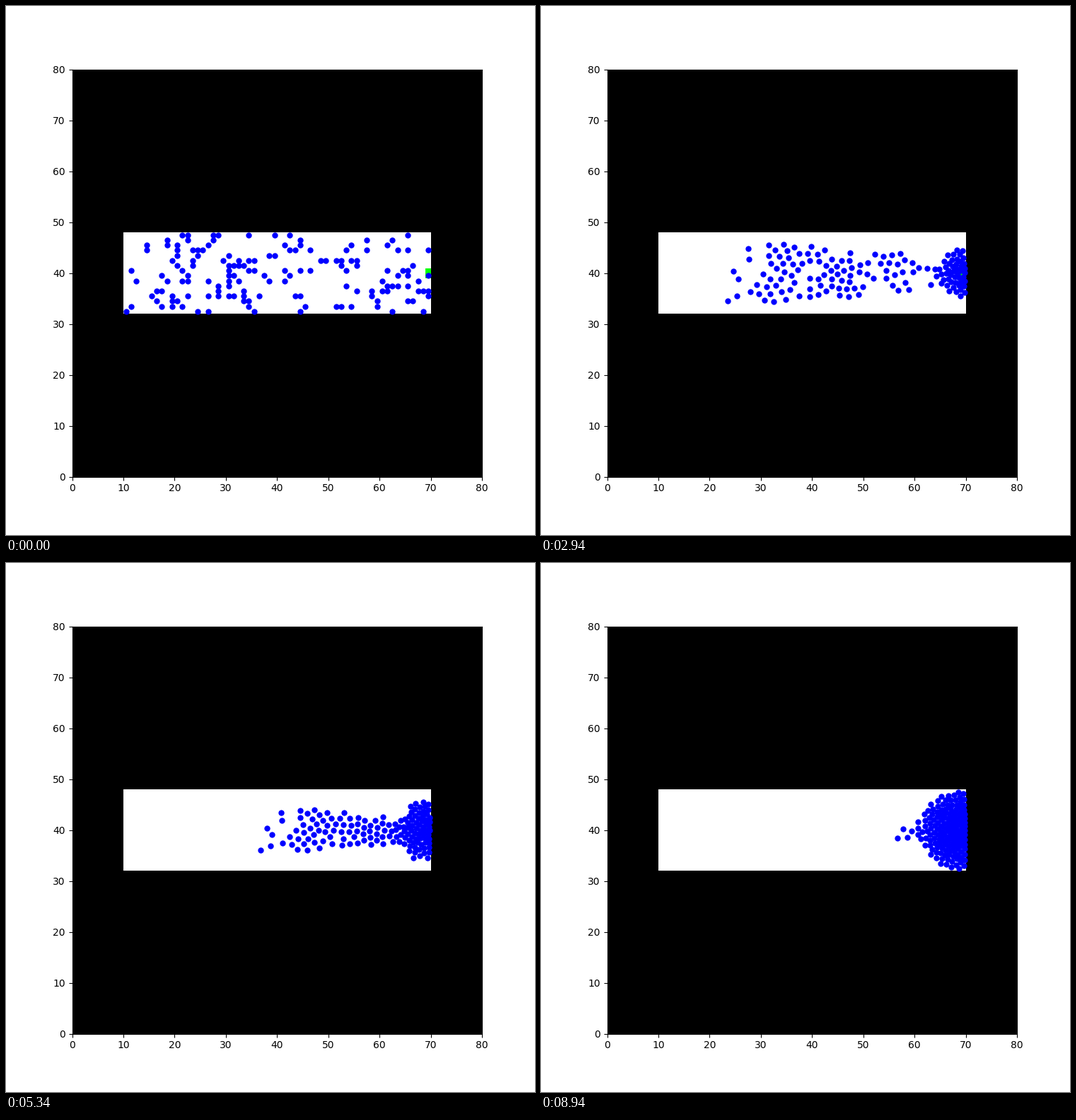
A matplotlib script that plays this animation: 748x748 px, repeating every 9000 ms.

```python
import numpy as np
import matplotlib.pyplot as plt
from matplotlib.animation import FuncAnimation
from matplotlib.colors import ListedColormap

SIZE = 80
FRAMES, INTERVAL = 150, 60
X0, X1, Y0, Y1 = 10, 70, 32, 48      # room
EXIT = np.array([70.0, 40.0])
SPEED, RELAX = 0.3345, 10.0          # cells per frame, frames
PUSH, RANGE, RADIUS = 0.04, 0.14, 0.5
SUBSTEPS = 4

# occupied columns at the start, one row of cells per line, top row first
ROWS = [
    [21, 22, 27, 28, 34, 39, 42, 65],
    [18, 22, 27, 44, 57, 62],
    [14, 18, 20, 26, 41, 44, 54, 61],
    [14, 20, 23, 24, 25, 42, 43, 46, 53, 57, 63, 65, 69],
    [20, 24, 30, 38, 39],
    [19, 23, 29, 32, 34, 35, 48, 49, 51, 52, 54, 55],
    [20, 23, 30, 31, 32, 33, 52, 55, 66],
    [11, 21, 30, 34, 35, 41, 44, 46, 53, 61, 64, 65],
    [17, 22, 30, 31, 37, 42, 63, 65, 69],
    [12, 18, 21, 22, 26, 30, 32, 38, 41, 60, 67],
    [28, 30, 53, 61, 62, 63, 65],
    [16, 17, 28, 33, 55, 58, 60, 61, 67, 68, 69],
    [15, 19, 22, 26, 28, 30, 31, 33, 36, 43, 44, 58, 69],
    [16, 19, 20, 33, 34, 59, 65, 66],
    [11, 17, 19, 21, 34, 45, 51, 52, 54, 59],
    [10, 24, 26, 35, 44, 62, 68],
]


def start():
    return np.array([(x + 0.5, Y1 - 0.5 - i)
                     for i, row in enumerate(ROWS) for x in row])


def repel(gap):
    return PUSH * np.exp(-gap / RANGE)


def acceleration(pos, vel):
    aim = EXIT - pos
    aim /= np.linalg.norm(aim, axis=1, keepdims=True) + 1e-9
    acc = (SPEED * aim - vel) / RELAX

    diff = pos[:, None] - pos[None]
    dist = np.sqrt((diff ** 2).sum(axis=2))
    np.fill_diagonal(dist, 1e6)
    acc += (diff * (repel(dist - 2 * RADIUS) / dist)[..., None]).sum(axis=1)

    x, y = pos.T
    acc[:, 0] += repel(x - X0 - RADIUS) - repel(X1 - x - RADIUS)
    acc[:, 1] += repel(y - Y0 - RADIUS) - repel(Y1 - y - RADIUS)
    return acc


def simulate():
    pos = start()
    vel = np.zeros_like(pos)
    dt = 1 / SUBSTEPS
    path = [pos.copy()]
    for _ in range(FRAMES - 1):
        for _ in range(SUBSTEPS):
            vel += acceleration(pos, vel) * dt
            pos += vel * dt
        path.append(pos.copy())
    return path


path = simulate()

floor = np.zeros((SIZE, SIZE))
floor[Y0:Y1, X0:X1] = 1
floor[39:41, 69] = 2

fig, ax = plt.subplots(figsize=(7.48, 7.48), dpi=100)
ax.pcolormesh(floor, cmap=ListedColormap(["black", "white", "lime"]))
ax.set_xlim(0, SIZE)
ax.set_ylim(0, SIZE)
crowd, = ax.plot([], [], "o", color="blue", markersize=5)


def draw(frame):
    crowd.set_data(*path[frame].T)
    return crowd,


anim = FuncAnimation(fig, draw, frames=FRAMES, interval=INTERVAL,
                     repeat=True, repeat_delay=0)
plt.show()
```
